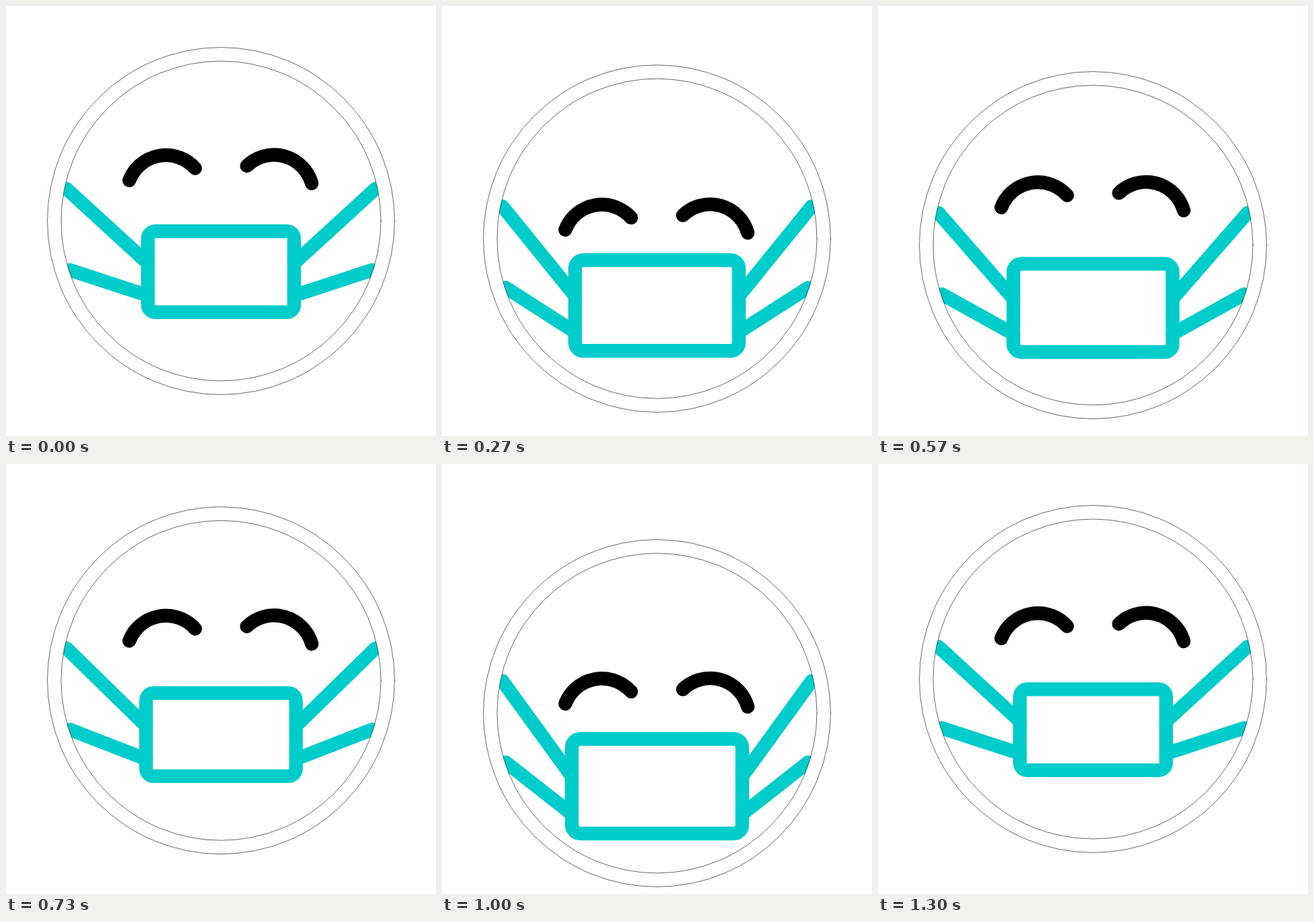
An HTML page for the animation above (1670 ms loop, 640 px wide and 640 px high).

```html
<!DOCTYPE html>
<html lang="en">
<head>
<meta charset="utf-8">
<title>Masked face</title>
<style>
  html, body { margin: 0; height: 100%; overflow: hidden; background: #fff; }
  svg { display: block; width: 100vw; height: 100vh; }
  svg * { fill: none; stroke-width: 20.4; stroke-linecap: round; }
  .mask { stroke: #00cccc; }
  #eyes { stroke: #000; }
  .band { stroke: #fff; }
  .hairline { stroke: #000; stroke-width: .6; shape-rendering: crispEdges; }
</style>
</head>
<body>
<svg viewBox="0 0 640 640">
  <path id="straps" class="mask"/>
  <g id="head">
    <circle class="band" cx="320" cy="320" r="248.2"/>
    <circle class="hairline" cx="320" cy="320" r="258.4"/>
    <circle class="hairline" cx="320" cy="320" r="238"/>
  </g>
  <rect id="cloth" class="mask"/>
  <path id="eyes" d="M183.5 259.5A58.3 58.3 0 0 1 281.5 241.5M358.5 238A58.2 58.2 0 0 1 455 264"/>
</svg>
<script>
const LOOP = 1670, FPS = 30, END = 39;
const [straps, head, cloth, eyes] =
  ["straps", "head", "cloth", "eyes"].map(id => document.getElementById(id));

// Two nods: rest, peak, dip, peak, rest, with a cosine ease between the beats.
function nod(peak, dip, ...beats) {
  const levels = [0, peak, dip, peak, 0];
  beats.push(END);
  return frame => {
    const i = beats.findLastIndex(beat => beat <= frame);
    if (i < 0 || i === beats.length - 1) return 0;
    const x = (frame - beats[i]) / (beats[i + 1] - beats[i]);
    return levels[i] + (levels[i + 1] - levels[i]) * (1 - Math.cos(Math.PI * x)) / 2;
  };
}

const eyeDrop = nod(101, 0, 1, 11.75, 21.05, 28.75);
const headDrop = nod(51, .8, 2.3, 13.5, 23, 29.75);
const maskGrowth = nod(.178, .018, 1, 12.4, 21, 28.2);

const shift = (el, y) => el.setAttribute("transform", `translate(0 ${y})`);

function draw(ms) {
  const frame = Math.floor((ms % LOOP + 5) * FPS / 1000);
  const headY = headDrop(frame), scale = 1 + maskGrowth(frame);

  shift(eyes, eyeDrop(frame));
  shift(head, headY);

  // The mask rides on the head and grows away from a point on the forehead.
  const cy = 195.5 + headY + 200 * scale;
  const halfW = 108.8 * scale, halfH = 60.3 * scale;
  const box = { x: 320 - halfW, y: cy - halfH, width: 2 * halfW, height: 2 * halfH, rx: 11 * scale };
  for (const name in box) cloth.setAttribute(name, box[name]);

  const strap = (side, x, y, knot) =>
    `M${320 + side * x} ${y + headY}L${320 + side * halfW} ${cy + knot * scale}`;
  straps.setAttribute("d", [-1, 1].map(side =>
    strap(side, 230, 272, -12.5) + strap(side, 225, 393, 35.5)).join(""));
}

function tick() {
  draw(performance.now());
  requestAnimationFrame(tick);
}
tick();
</script>
</body>
</html>
```
